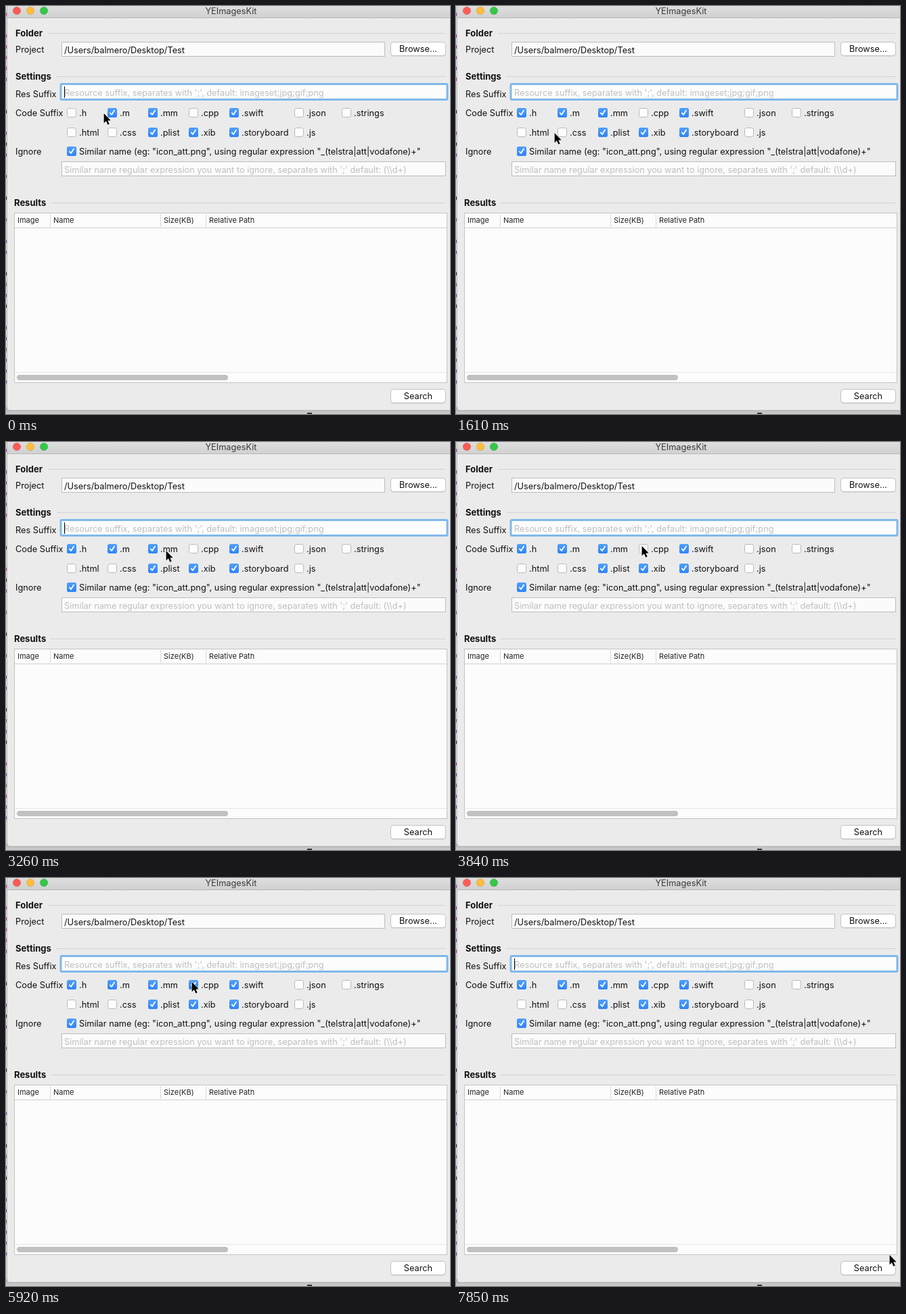
An HTML page for the animation above (8 s loop, 656 px wide and 604 px high).

```html
<!DOCTYPE html>
<html lang="en">
<head>
<meta charset="utf-8">
<title>YEImagesKit</title>
<style>
  html, body { margin: 0; width: 100%; height: 100%; overflow: hidden; background: #ebebeb; }
  svg { display: block; width: 656px; height: 604px; }
  text { font: 12.75px Inter, "Open Sans", sans-serif; fill: #111; white-space: pre; }
  .title { fill: #3c3c3c; }
  .bold { font-size: 13px; font-weight: 700; }
  .head { font-size: 11px; fill: #222; }
  .hint { fill: #bfbfbf; }
  .mid { text-anchor: middle; }
</style>
</head>
<body>
<svg id="stage" viewBox="0 0 656 604">
  <defs>
    <linearGradient id="bar" x2="0" y2="1"><stop stop-color="#dedede"/><stop offset="1" stop-color="#d1d1d1"/></linearGradient>
    <linearGradient id="shade" x2="0" y2="1"><stop stop-color="#a9a9a9"/><stop offset="1" stop-color="#cfcfcf"/></linearGradient>
    <linearGradient id="blue" x2="0" y2="1"><stop stop-color="#4f9ffb"/><stop offset="1" stop-color="#2f84f7"/></linearGradient>
  </defs>
</svg>
<script>
const LOOP = 8000;
const TICK = 147;   // the pointer moves once per tick
const BLINK = 1190;
const stage = document.getElementById('stage');

function add(tag, attrs, parent = stage) {
  const el = document.createElementNS('http://www.w3.org/2000/svg', tag);
  for (const key in attrs) el.setAttribute(key, attrs[key]);
  return parent.appendChild(el);
}
const rect = (x, y, width, height, fill, more) => add('rect', { x, y, width, height, fill, ...more });
const line = (x1, y1, x2, y2, stroke) => add('path', { d: `M${x1} ${y1}L${x2} ${y2}`, stroke });
const label = (x, y, str, cls = '') => { add('text', { x, y, class: cls }).textContent = str; };

function field(y, w, str, cls) {
  rect(82.5, y + .5, w - 1, 21, '#fbfbfb', { stroke: '#bdbdbd' });
  label(86, y + 17, str, cls);
}

function button(y, str) {
  rect(568.5, y + 1, 81, 20.5, '#c9c9c9', { rx: 4 });
  rect(568.5, y + .5, 81, 20, '#fff', { rx: 4, stroke: '#c2c2c2' });
  label(609, y + 15, str, 'mid');
}

// Returns a setter for the state: 'off', 'down' or 'on'.
function checkbox(cx, cy, str, state) {
  label(cx + 11, cy + 5, str);
  const g = add('g', { transform: `translate(${cx} ${cy})` });
  const box = { x: -6.5, y: -6.5, width: 13, height: 13, rx: 2.8 };
  const empty = add('rect', { ...box, stroke: '#b9b9b9' }, g);
  const on = add('g', {}, g);
  add('rect', { ...box, x: -7, y: -7, width: 14, height: 14, fill: 'url(#blue)' }, on);
  add('path', { d: 'M-3.2 .4L-1 3L3.1 -3.4', fill: 'none', stroke: '#fff', 'stroke-width': 1.8,
    'stroke-linecap': 'round', 'stroke-linejoin': 'round' }, on);
  const set = value => {
    empty.setAttribute('fill', value === 'down' ? '#e4e4e4' : '#fdfdfd');
    on.setAttribute('visibility', value === 'on' ? 'visible' : 'hidden');
  };
  set(state);
  return set;
}

let seed = 7;
const random = () => (seed = seed * 16807 % 2147483647) / 2147483647;

// Sliver of the editor behind the window
rect(0, 0, 656, 604, '#e6e6e6');
const inks = ['#b13bb0', '#6a55b8', '#333', '#777'];
for (let y = 10; y < 565; y += 16) {
  const ink = y < 150 ? inks[0] : inks[Math.floor(random() * inks.length)];
  if (random() < .75) rect(0, y, 1.5, 5, ink);
}

// Window
rect(0, 594, 656, 10, 'url(#shade)');
rect(445, 602, 7, 2, '#333');
add('path', { d: 'M2 0H656V598H6Q2 598 2 594Z', fill: '#ebebeb' });
line(1.5, 0, 1.5, 595, '#b5b5b5');
rect(2, 0, 654, 17, 'url(#bar)');
line(2, 17.5, 656, 17.5, '#b8b8b8');
['#fc5b57', '#fdbd3f', '#34c749'].forEach((fill, i) =>
  add('circle', { cx: 16 + 20 * i, cy: 7, r: 5.8, fill, stroke: '#0002', 'stroke-width': .8 }));
label(332.5, 12, 'YEImagesKit', 'title mid');

// Sections
[[14, 45, 'Folder', 62], [14, 109, 'Settings', 75], [12, 296, 'Results', 66]].forEach(([x, y, str, from]) => {
  label(x, y, str, 'bold');
  line(from, y - 4.5, 649, y - 4.5, '#d2d2d2');
});
[[69, 'Project'], [135, 'Res Suffix'], [163, 'Code Suffix'], [220, 'Ignore']].forEach(([y, str]) => label(14, y, str));

field(53, 478, '/Users/balmero/Desktop/Test');
button(53, 'Browse...');

rect(81, 115.5, 571, 23, '#fcfcfc', { rx: 1.5, stroke: '#7fb8ea', 'stroke-width': 3 });
label(86, 133, "Resource suffix, separates with ';', default: imageset;jpg;gif;png", 'hint');

const columns = [97, 157, 217, 277, 337, 433, 503];
const rows = [
  ['.h', '.m', '.mm', '.cpp', '.swift', '.json', '.strings'],
  ['.html', '.css', '.plist', '.xib', '.storyboard', '.js']
];
const checked = ['.m', '.mm', '.swift', '.plist', '.xib', '.storyboard'];
const boxes = {};
rows.forEach((names, row) => names.forEach((name, i) => {
  boxes[name] = checkbox(columns[i], 158 + 29 * row, name, checked.includes(name) ? 'on' : 'off');
}));
checkbox(97, 215, 'Similar name (eg: "icon_att.png", using regular expression "_(telstra|att|vodafone)+"', 'on');

field(230, 568, "Similar name regular expression you want to ignore, separates with ';' default: (\\\\d+)", 'hint');

// Results table
rect(12.5, 306.5, 639, 251, '#fcfcfc', { stroke: '#c3c3c3' });
line(13, 328.5, 651, 328.5, '#d0d0d0');
[[17, 'Image'], [70, 'Name'], [233, 'Size(KB)'], [300, 'Relative Path']].forEach(([x, str], i) => {
  label(x, 321, str, 'head');
  if (i) line(x - 4.5, 308, x - 4.5, 327, '#d9d9d9');
});
line(13, 542.5, 651, 542.5, '#e6e6e6');
rect(16, 546, 312, 8, '#c1c1c1', { rx: 4 });
button(567, 'Search');

const caret = rect(86, 119, 1, 17, '#000');
const pointer = add('path', {
  d: 'M.6 1V15.4L3.9 12.3L6.3 17.8L8.7 16.8L6.4 11.4H10.8Z',
  fill: '#000', stroke: '#fff', 'stroke-width': 1.1, 'paint-order': 'stroke'
});

// Pointer stops: time, x, y
const stops = [[0, 144, 158], [440, 124, 171], [880, 96, 162], [1150, 96, 162], [1600, 145, 187],
  [2950, 145, 187], [3230, 236, 160], [3650, 274, 153], [7400, 274, 153], [7790, 640, 557]];
const presses = { '.h': 740, '.cpp': 4130 };

function pointerAt(t) {
  const next = stops.findIndex(stop => stop[0] > t);
  if (next < 0) return stops.at(-1).slice(1);
  const [t0, x0, y0] = stops[next - 1], [t1, x1, y1] = stops[next];
  const p = (t - t0) / (t1 - t0), ease = p * p * (3 - 2 * p);
  return [x0 + (x1 - x0) * ease, y0 + (y1 - y0) * ease].map(Math.round);
}

// Clicking .cpp restarts the blinking
function caretOn(t) {
  const since = t < presses['.cpp'] ? t - 870 : t - presses['.cpp'];
  return (since + BLINK) % BLINK < BLINK / 2 - 5;
}

const start = performance.now();
function draw() {
  const t = (performance.now() - start) % LOOP;
  const ticked = Math.floor((t + 10) / TICK) * TICK;
  pointer.setAttribute('transform', `translate(${pointerAt(ticked)})`);
  caret.setAttribute('opacity', +caretOn(t));
  for (const name in presses) {
    const held = t - presses[name];
    boxes[name](held < 0 ? 'off' : held < TICK - 10 ? 'down' : 'on');
  }
  requestAnimationFrame(draw);
}
draw();
</script>
</body>
</html>
```
